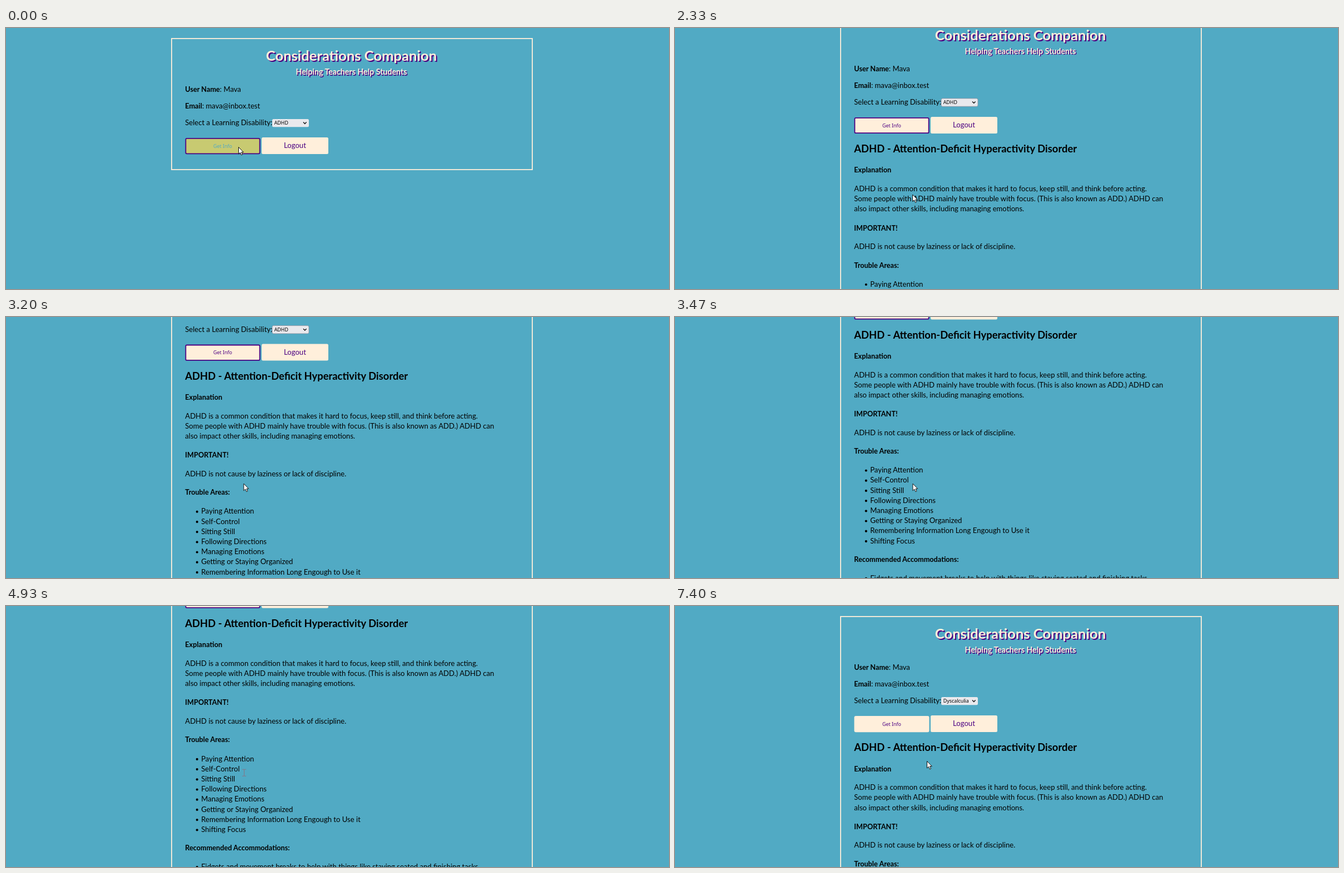
Animation, 1193 px wide and 470 px high, one loop 8 s. Source, as an HTML page:

```html
<!DOCTYPE html>
<html lang="en">
<head>
<meta charset="utf-8">
<title>Considerations Companion</title>
<style>
  html, body { margin: 0; width: 100%; height: 100%; overflow: hidden; background: #51aac4; }
  svg { display: block; width: 1193px; height: 470px; }
  text { font: 13.1px Lato, sans-serif; fill: #000; white-space: pre; }
  .b { font-weight: 700; font-size: 12.7px; }
  .h2 { font-weight: 700; font-size: 18.4px; }
  .h1 { font-weight: 700; font-size: 25.6px; }
  .h3 { font-weight: 700; font-size: 14.2px; }
  .mid { text-anchor: middle; }
  .ui { font: 8.9px "Noto Sans", "Open Sans", sans-serif; }
</style>
</head>
<body>
<svg viewBox="0 0 1193 470">
  <rect width="1193" height="470" fill="#51aac4"/>
  <g id="page">
    <rect id="panel" x="298" y="19" width="649" fill="none" stroke="#ffefdb" stroke-width="1.8"/>
    <g id="head"></g>
    <rect id="select" x="479" y="164" width="66" height="14.3" rx="2.5" fill="#e9e9ed" stroke="#8f8f9d"/>
    <text id="choice" class="ui" x="482.7" y="174.4"></text>
    <path d="M535 169.6l2.8 2.8l2.8-2.8" fill="none" stroke="#111" stroke-width="1.4"/>
    <rect id="info" x="323.4" y="198.9" width="133.2" height="27.4" rx="2" stroke-width="1.8"/>
    <text id="infoText" class="ui mid" x="390" y="215.8">Get Info</text>
    <rect id="out" x="460" y="197" width="120" height="30" rx="2.5"/>
    <text id="outText" class="mid" x="520" y="216">Logout</text>
    <g id="article"></g>
  </g>
  <path id="arrow" d="M0 0V12.5L2.9 9.8L4.9 14.3L7 13.4L5.1 9.1H8.8Z" fill="#fff" stroke="#111" stroke-width="1"/>
  <path id="beam" d="M-3.5-6H-.8L0-5.2L.8-6H3.5M0-5.2V5.2M-3.5 6H-.8L0 5.2L.8 6H3.5" fill="none" stroke="#83788a" stroke-width="1.1"/>
</svg>
<script>
const $ = id => document.getElementById(id);
const LOOP = 8000, TICK = 1000 / 15;
const CREAM = '#ffefdb', INDIGO = '#4b0082', KHAKI = '#c8ca71', SEA = '#51aac4';

function add(parent, tag, attrs, html = '') {
  const el = document.createElementNS('http://www.w3.org/2000/svg', tag);
  for (const k in attrs) el.setAttribute(k, attrs[k]);
  el.innerHTML = html;
  return $(parent).appendChild(el);
}
const line = (parent, y, html, cls = '', x = 322.3) => add(parent, 'text', { x, y, class: cls }, html);

function shadowed(y, text, cls, offset) {
  for (const [d, fill] of [[offset, INDIGO], [0, CREAM]])
    add('head', 'text', { x: 621.5 + d, y: y + d, class: cls + ' mid', style: 'fill:' + fill }, text);
}

function list(y, items) {
  items.forEach((item, i) => {
    const base = y + i * 18.2;
    add('article', 'circle', { cx: 343.8, cy: base - 3.8, r: 2.1 });
    line('article', base, item, '', 351.2);
  });
}

shadowed(59, 'Considerations Companion', 'h1', 2);
shadowed(84, 'Helping Teachers Help Students', 'h3', 1.6);
line('head', 115, '<tspan class="b">User Name</tspan>: Mava');
line('head', 145, '<tspan class="b">Email</tspan>: mava@inbox.test');
line('head', 175, 'Select a Learning Disability:');

line('article', 261.3, 'ADHD - Attention-Deficit Hyperactivity Disorder', 'h2');
line('article', 297.6, 'Explanation', 'b');
line('article', 331.2, 'ADHD is a common condition that makes it hard to focus, keep still, and think before acting.');
line('article', 349.4, 'Some people with ADHD mainly have trouble with focus. (This is also known as ADD.) ADHD can');
line('article', 367.6, 'also impact other skills, including managing emotions.');
line('article', 401.7, 'IMPORTANT!', 'b');
line('article', 435.2, 'ADHD is not cause by laziness or lack of discipline.');
line('article', 468.7, 'Trouble Areas:', 'b');
list(502.9, ['Paying Attention', 'Self-Control', 'Sitting Still', 'Following Directions', 'Managing Emotions',
  'Getting or Staying Organized', 'Remembering Information Long Engough to Use it', 'Shifting Focus']);
line('article', 663.6, 'Recommended Accommodations:', 'b');
list(697.2, ['Fidgets and movement breaks to help with things like staying seated and finishing tasks',
  'Strategies for coping with anxiety, which is common in people with ADHD',
  'Treatments like ADHD medication or behavior therapy']);

// Keys are [tick, value...]; the screen updates 15 times a second.
const scrollKeys = [[0, 0], [32, 0], [38, 74.2], [44, 74.2], [48, 148.4], [49, 148.4], [52, 222.6], [55, 222.6],
  [58, 296.8], [59, 297.4], [61, 223.2], [74, 223.2], [78, 149], [82, 74.6], [86, 0]];
const mouseKeys = [[0, 418, 214], [5, 418, 214], [6, 421, 239], [8, 421, 239], [12, 429, 270], [18, 429, 270],
  [19, 429, 272], [27, 427, 292], [32, 427, 292], [34, 427, 299.5], [80, 428, 300], [86, 429, 244], [87, 429, 244],
  [91, 438, 218], [93, 470, 190], [95, 515, 172], [96, 515, 172], [98, 501, 206], [99, 501, 206],
  [100, 501, 207], [102, 501, 207], [111, 453, 279]];

const smooth = u => u * u * (3 - 2 * u);

function at(keys, k, ease = u => u) {
  const i = keys.findIndex(key => key[0] > k);
  if (i < 0) return keys[keys.length - 1].slice(1);
  const a = keys[i - 1], b = keys[i];
  const u = ease((k - a[0]) / (b[0] - a[0]));
  return a.slice(1).map((v, j) => v + (b[j + 1] - v) * u);
}

function paint(id, hover, border) {
  $(id).setAttribute('fill', hover ? KHAKI : CREAM);
  $(id).setAttribute('stroke', border);
  $(id + 'Text').style.fill = hover ? SEA : INDIGO;
}

function draw(ms) {
  const k = Math.floor((ms + 5) / TICK);
  const [top] = at(scrollKeys, k, smooth);
  const [x, y] = at(mouseKeys, k);
  const open = k >= 5, menu = k >= 96 && k < 103;
  const over = (l, r, t, b) => !menu && x > l && x < r && y + top > t && y + top < b;
  const hoverInfo = over(322, 457, 198, 227);

  $('page').setAttribute('transform', `translate(0 ${-top})`);
  $('panel').setAttribute('height', open ? 744 : 236);
  $('article').style.display = open ? '' : 'none';
  $('select').setAttribute('stroke-opacity', top > 0 ? 0.8 : 0);
  $('choice').textContent = k < 103 ? 'ADHD' : 'Dyscalculia';
  paint('info', hoverInfo, k < 96 ? INDIGO : hoverInfo ? KHAKI : CREAM);
  paint('out', over(460, 580, 197, 227), 'none');

  const text = k >= 60 && k < 81;
  $('arrow').style.display = text ? 'none' : '';
  $('beam').style.display = text ? '' : 'none';
  $('arrow').setAttribute('transform', `translate(${x + 0.5} ${y + 0.5})`);
  $('beam').setAttribute('transform', `translate(${x + 0.7} ${y + 0.3})`);
}

const start = performance.now();
function loop(now) {
  draw(Math.max(0, now - start) % LOOP);
  requestAnimationFrame(loop);
}
draw(0);
requestAnimationFrame(loop);
</script>
</body>
</html>
```
